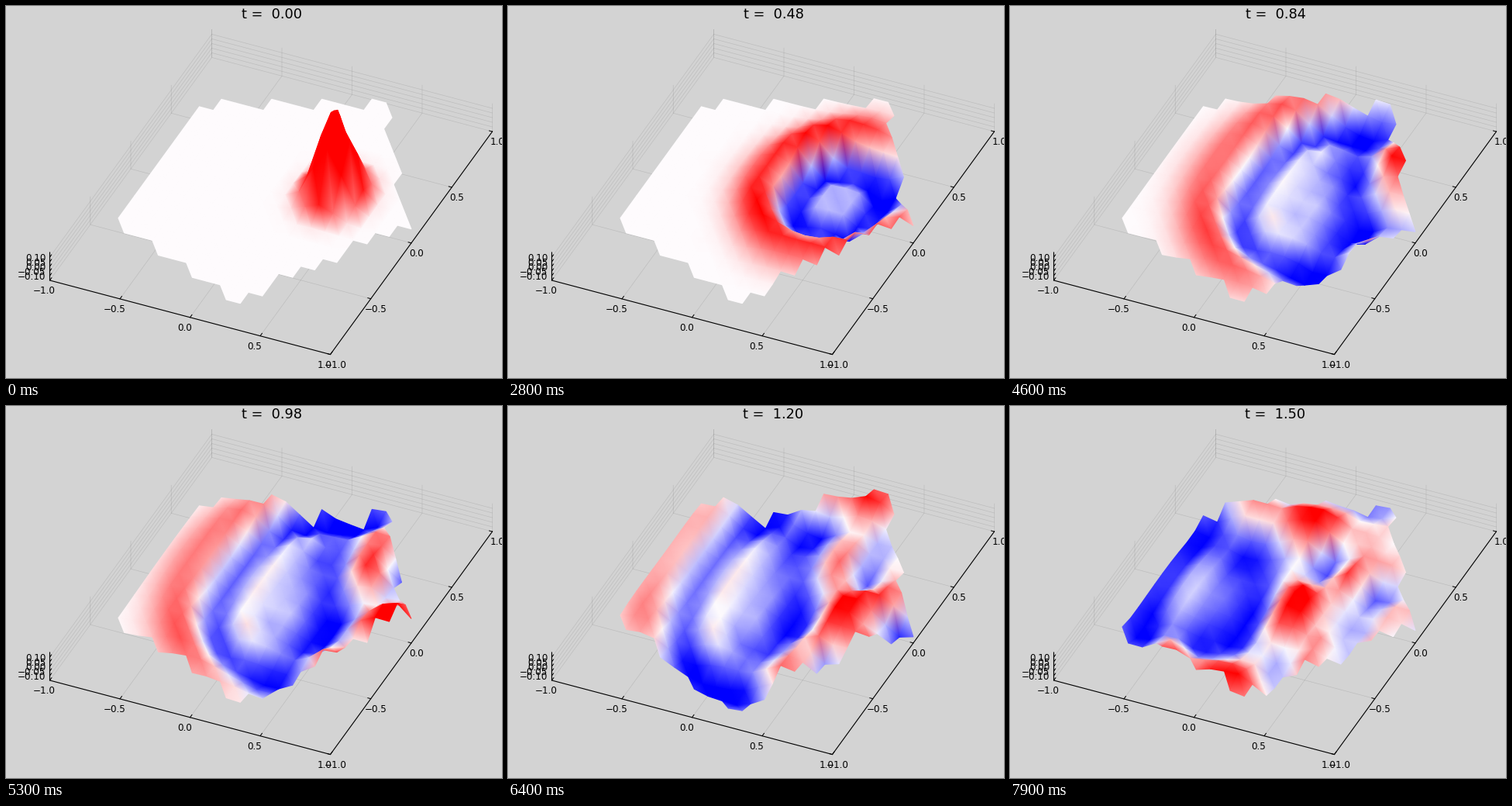
Write a matplotlib script that moves like this. It is 640 by 480 pixels and loops after 8000 ms.

```python
import numpy as np
import matplotlib.pyplot as plt
from matplotlib.animation import FuncAnimation
from matplotlib.colors import LinearSegmentedColormap
from matplotlib.tri import Triangulation

W, H, DPI = 640, 480, 100
FRAMES, HOLD = 80, 4          # the first state is held a little longer
STEP, SUB = 0.02, 2           # time per frame, solver steps per frame
CELL, N = 0.1, 21
ZLIM, TOP = 0.15, 0.885       # colour range and upper clipping height
BWR = LinearSegmentedColormap.from_list("bwr3", ["blue", "#fefcfe", "red"])


def project(x, y, z):
    """Orthographic view: world to pixels."""
    return 342 + 181 * x + 104.5 * y, 240 + 47.8 * x - 143.8 * y - 120 * z


# Grid nodes inside a regular pentagon
gx, gy = np.meshgrid((np.arange(N) - 10) * CELL, (np.arange(N) - 10) * CELL,
                     indexing="ij")
angles = np.radians(36 + 72 * np.arange(5))
inside = np.all([gx * np.cos(a) + gy * np.sin(a) <= np.cos(np.pi / 5) + 1e-9
                 for a in angles], axis=0)


def laplacian(u):
    p = np.pad(u, 1)
    return (p[2:, 1:-1] + p[:-2, 1:-1] + p[1:-1, 2:] + p[1:-1, :-2]
            - 4 * u) / CELL ** 2


def solve(count):
    """Wave equation from a resting bump, zero outside the pentagon."""
    dt = STEP / SUB
    u = np.exp(-((gx - 0.4) ** 2 + (gy - 0.1) ** 2) / 0.02) * inside
    prev = u + 0.5 * dt ** 2 * laplacian(u) * inside
    states = [u]
    for _ in range(count):
        for _ in range(SUB):
            u, prev = 2 * u - prev + dt ** 2 * laplacian(u) * inside, u
        states.append(u)
    return states


def build_triangles():
    """Triangles fully inside, sorted from back to front."""
    tris = []
    for i in range(N - 1):
        for j in range(N - 1):
            a, b, c, d = (i, j), (i + 1, j), (i, j + 1), (i + 1, j + 1)
            tris += [t for t in ((a, b, c), (b, d, c))
                     if all(inside[p] for p in t)]
    return sorted(tris, key=lambda t: sum(48 * gx[p] - 144 * gy[p] for p in t))


def clip(tri):
    """Cut a triangle at the clipping height."""
    out = []
    for p, q in zip(tri, tri[1:] + tri[:1]):
        if p[2] <= TOP:
            out.append(p)
        if (p[2] > TOP) != (q[2] > TOP):
            f = (TOP - p[2]) / (q[2] - p[2])
            out.append(tuple(a + f * (b - a) for a, b in zip(p, q)))
    return out


states = solve(FRAMES - 1 - HOLD)
triangles = build_triangles()

fig = plt.figure(figsize=(W / DPI, H / DPI), dpi=DPI, facecolor="#d3d3d3")
ax = fig.add_axes([0, 0, 1, 1])
ax.set_xlim(0, W)
ax.set_ylim(H, 0)
ax.axis("off")


def line(points, **style):
    xs, ys = zip(*(project(*p) for p in points))
    ax.plot(xs, ys, color="black", **style)


def tick(x, y, dx, dy):
    ax.plot([x, x + dx], [y, y + dy], color="black", lw=0.72, zorder=2)


def label(x, y, s, size=12, ha="center"):
    return ax.text(x, y + 0.365 * size, s, size=size * 72 / DPI, ha=ha,
                   va="baseline", family="DejaVu Sans", zorder=5)


def number(v, digits):
    return f"{v:.{digits}f}".replace("-", "\u2212")


def draw_axes():
    grid = dict(lw=0.5, alpha=0.1, zorder=1)
    axis = dict(lw=0.8, zorder=2)
    lo, hi = -ZLIM, ZLIM
    for v in (-1, -0.5, 0, 0.5, 1):
        line([(v, -1, lo), (v, 1, lo), (v, 1, hi)], **grid)
        line([(1, v, lo), (-1, v, lo), (-1, v, hi)], **grid)
        x, y = project(v, -1, lo)
        tick(x, y, 2.4, -3.3)
        label(x - 7, y + 12.8, number(v, 1))
        x, y = project(1, v, lo)
        tick(x, y, -3.9, -1)
        label(x + 6.3, y + 13, number(v, 1))
    for v in (-0.1, -0.05, 0, 0.05, 0.1):
        line([(-1, -1, v), (-1, 1, v), (1, 1, v)], **grid)
        x, y = project(-1, -1, v)
        tick(x, y, 2.2, -3)
        label(x - 5, y + 1, number(v, 2), ha="right")
    line([(-1, -1, hi), (-1, -1, lo), (1, -1, lo), (1, 1, lo)], **axis)


draw_axes()
title = label(342.5, 9.6, "", size=17.7)


def draw(n):
    k = max(0, n - HOLD)
    u = states[k]
    for old in list(ax.collections):
        old.remove()
    pts, faces = [], []
    for t in triangles:
        poly = clip([(gx[p], gy[p], u[p]) for p in t])
        base = len(pts)
        pts += poly
        faces += [(base, base + m, base + m + 1)
                  for m in range(1, len(poly) - 1)]
    x, y, z = np.array(pts).T
    ax.tripcolor(Triangulation(*project(x, y, z), triangles=faces), z,
                 shading="gouraud", cmap=BWR, vmin=-ZLIM, vmax=ZLIM, zorder=3)
    title.set_text(f"t =  {k * STEP:.2f}")
    return []


anim = FuncAnimation(fig, draw, frames=FRAMES, interval=100, repeat=True,
                     repeat_delay=0, init_func=lambda: [])
plt.show()
```
